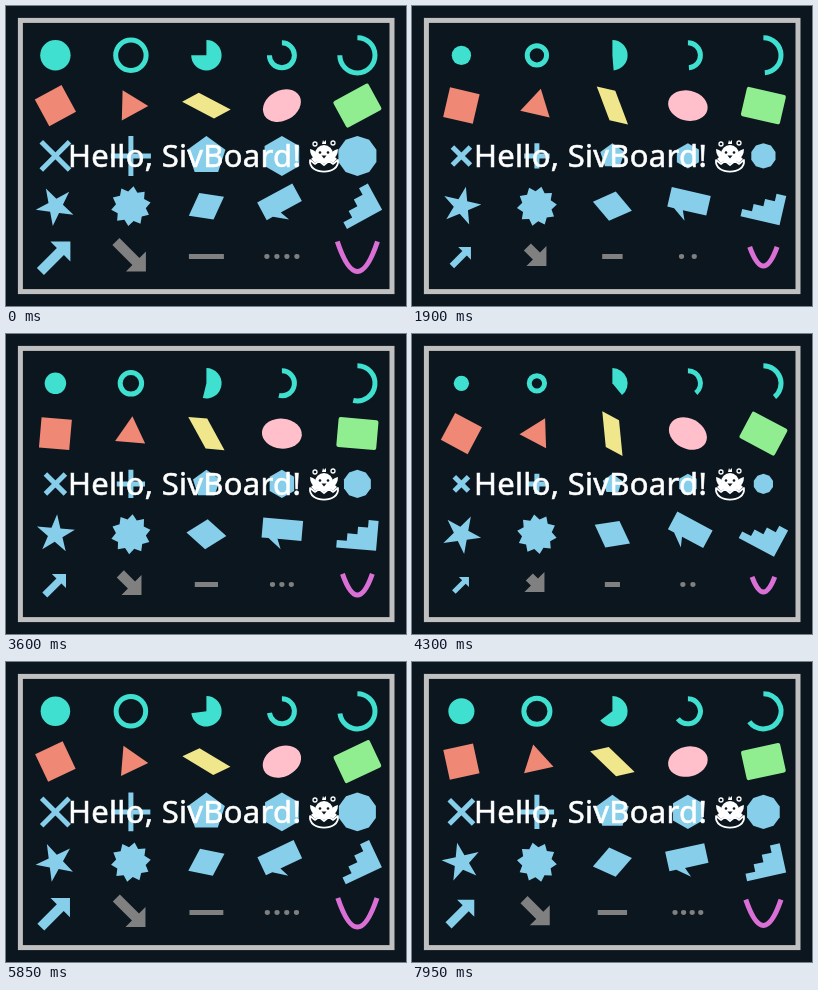
Write an HTML page that moves like this. It is 400 px wide and 300 px high and loops after 8000 ms.

```html
<!DOCTYPE html>
<html lang="en">
<head>
<meta charset="utf-8">
<title>Shape board</title>
<style>
html, body { margin: 0; width: 100%; height: 100%; overflow: hidden; background: #0b161f; }
svg { display: block; width: 100vw; height: 100vh; }
text { font: 31px "Noto Sans", "Open Sans", sans-serif; letter-spacing: .3px; }
</style>
</head>
<body>
<svg id="stage" viewBox="0 0 400 300">
  <rect width="400" height="300" fill="#0b161f"/>
  <rect x="14.4" y="14.4" width="371.600" height="271.200" fill="none" stroke="#c0c0c0" stroke-width="5"/>
  <g id="shapes"></g>
  <text x="62" y="161" fill="#fff" stroke="#fff" stroke-width=".6">Hello, SivBoard!</text>
  <g id="chick" fill="#fff" stroke-linejoin="round">
    <path d="M304 143q5 1 7 5v6q-7-3-7-11zM332 143q-5 1-7 5v6q7-3 7-11z"/>
    <circle cx="318" cy="148" r="9"/>
    <path d="M304 154l5 4 4-3 5 4 5-4 4 3 5-4C334 169.500 302 169.500 304 154z" fill="#0b161f" stroke="#fff" stroke-width="1.7"/>
    <path d="M305 153l4 4 4-3 5 4 5-4 4 3 4-4-3-3h-20z"/>
    <g fill="none" stroke="#fff" stroke-width="1.300"><circle cx="309" cy="138" r="2"/><circle cx="327" cy="137" r="2"/></g>
    <path d="M316 138l1-4 1 2 2-2v4z"/>
    <g fill="#0b161f"><circle cx="314" cy="146.500" r="1.3"/><circle cx="322" cy="146.500" r="1.3"/><path d="M315.500 149.500h5l-2.500 3z"/></g>
  </g>
</svg>
<script>
const LOOP = 8000, PERIOD = 2818;
const TURQUOISE = '#40e0d0', SALMON = '#f08876', KHAKI = '#f0e68c', PINK = '#ffc0cb',
      GREEN = '#90ee90', SKY = '#87ceeb', GRAY = '#808080', ORCHID = '#da70d6';
const shapes = document.getElementById('shapes');
const updates = [];

// Adds one shape at a grid cell; update(state) returns the attributes that change.
function add(col, row, tag, attrs, update) {
  const cell = document.createElementNS('http://www.w3.org/2000/svg', 'g');
  const el = document.createElementNS('http://www.w3.org/2000/svg', tag);
  cell.setAttribute('transform', `translate(${49.4 + 75.5 * col} ${49.3 + 50.3 * row})`);
  set(el, attrs);
  cell.append(el);
  shapes.append(cell);
  updates.push(state => set(el, update(state)));
}

function set(el, attrs) {
  for (const name in attrs) el.setAttribute(name, attrs[name]);
}

const spin = s => ({ transform: `rotate(${s.angle})` });
const path = fn => s => ({ d: fn(s) });
const line = (color, width = 5) => ({ fill: 'none', stroke: color, 'stroke-width': width });
const poly = pts => 'M' + pts.map(p => p.map(v => v.toFixed(2)).join(' ')).join('L') + 'Z';

// Point on a circle, clockwise degrees from the top.
function polar(r, deg) {
  const a = deg * Math.PI / 180;
  return [r * Math.sin(a), -r * Math.cos(a)];
}

const ngon = (n, r) => poly(Array.from({ length: n }, (_, i) => polar(r, 360 * i / n)));
const star = (n, r, inner) =>
  poly(Array.from({ length: 2 * n }, (_, i) => polar(i % 2 ? inner : r, 180 * i / n)));
const arc = (r, sweep) => `M0 ${-r}A${r} ${r} 0 ${sweep > 180 ? 1 : 0} 1 ${polar(r, sweep).join(' ')}`;

// Arrow along +x, from -d to d, with a right-angled head of the given leg.
function arrow(d, width, leg) {
  const half = leg / Math.SQRT2, w = width / 2, neck = d - half;
  return poly([[-d, -w], [neck, -w], [neck, -half], [d, 0], [neck, half], [neck, w], [-d, w]]);
}

function dots(r) {
  const n = Math.floor(2 * r / 8.5), gap = 2 * r / n;
  let d = '';
  for (let i = 0; i < n; i++) {
    const x = (i - (n - 1) / 2) * gap;
    d += `M${x - 2.6} 0a2.6 2.4 0 1 1 5.2 0a2.6 2.4 0 1 1 -5.2 0`;
  }
  return d;
}

function stairs(steps, w, h) {
  const pts = [[w / 2, h / 2], [-w / 2, h / 2]];
  for (let i = 0; i < steps; i++) {
    const y = h / 2 - h * (i + 1) / steps;
    pts.push([-w / 2 + w * i / steps, y], [-w / 2 + w * (i + 1) / steps, y]);
  }
  return poly(pts);
}

function valley(r) {
  const x = 2.5 + .88 * r, y = -.75 * r;
  return `M${-x} ${y}Q0 ${2.25 * r} ${x} ${y}`;
}

const bar = s => `M${-s.r} 0H${s.r}M0 ${-s.r}V${s.r}`;
const spun = (col, row, color, d) => add(col, row, 'path', { fill: color, d }, spin);

// Row 1: circles and arcs
add(0, 0, 'circle', { fill: TURQUOISE }, s => ({ r: .76 * s.r }));
add(1, 0, 'circle', line(TURQUOISE), s => ({ r: .76 * s.r }));
add(2, 0, 'path', { fill: TURQUOISE }, path(s => arc(15.2, s.sweep) + 'L0 0Z'));
add(3, 0, 'path', line(TURQUOISE), path(s => arc(12.5, s.sweep)));
add(4, 0, 'path', line(TURQUOISE), path(s => arc(17.6, s.sweep)));

// Row 2: rotating basics
spun(0, 1, SALMON, poly([[-15.2, -15.2], [15.2, -15.2], [15.2, 15.2], [-15.2, 15.2]]));
spun(1, 1, SALMON, ngon(3, 17.4));
spun(2, 1, KHAKI, poly([[-19.5, -15], [-.5, -15], [19.5, 15], [.5, 15]]));
add(3, 1, 'ellipse', { fill: PINK, rx: 20, ry: 15 }, spin);
add(4, 1, 'rect', { fill: GREEN, x: -20, y: -15, width: 40, height: 30, rx: 2 }, spin);

// Row 3: resizing polygons
add(0, 2, 'path', { ...line(SKY), transform: 'rotate(45)' }, path(bar));
add(1, 2, 'path', line(SKY), path(bar));
[5, 6, 10].forEach((n, i) => add(2 + i, 2, 'path', { fill: SKY }, path(s => ngon(n, s.r))));

// Row 4: rotating polygons
spun(0, 3, SKY, star(5, 20, 7.64));
spun(1, 3, SKY, star(10, 20, 15));
spun(2, 3, SKY, poly([[-20, 0], [0, -15], [20, 0], [0, 15]]));
spun(3, 3, SKY, poly([[-20, -15], [20, -15], [20, 5], [-4, 5], [0, 15], [-13, 5], [-20, 5]]));
spun(4, 3, SKY, stairs(4, 40, 30));

// Row 5: arrows, lines and a curve
add(0, 4, 'path', { fill: SKY, transform: 'rotate(-45)' },
  path(s => arrow(1.06 * s.r, .5 * s.r, s.r)));
add(1, 4, 'path', { fill: GRAY, transform: 'rotate(45)' }, path(s => arrow(1.06 * s.r, 10, 20)));
add(2, 4, 'path', line(GRAY), path(s => `M${2.5 - s.r} 0H${s.r - 2.5}`));
add(3, 4, 'path', { fill: GRAY }, path(s => dots(s.r)));
add(4, 4, 'path', line(ORCHID), path(s => valley(s.r)));

function render(t) {
  const wave = Math.cos(2 * Math.PI * t / PERIOD);
  const state = { angle: -28.5 * wave, r: 15 + 5 * wave, sweep: 205 + 65 * wave };
  updates.forEach(update => update(state));
}

const start = performance.now();
function tick() {
  render((performance.now() - start) % LOOP);
  requestAnimationFrame(tick);
}
render(0);
requestAnimationFrame(tick);
</script>
</body>
</html>
```
